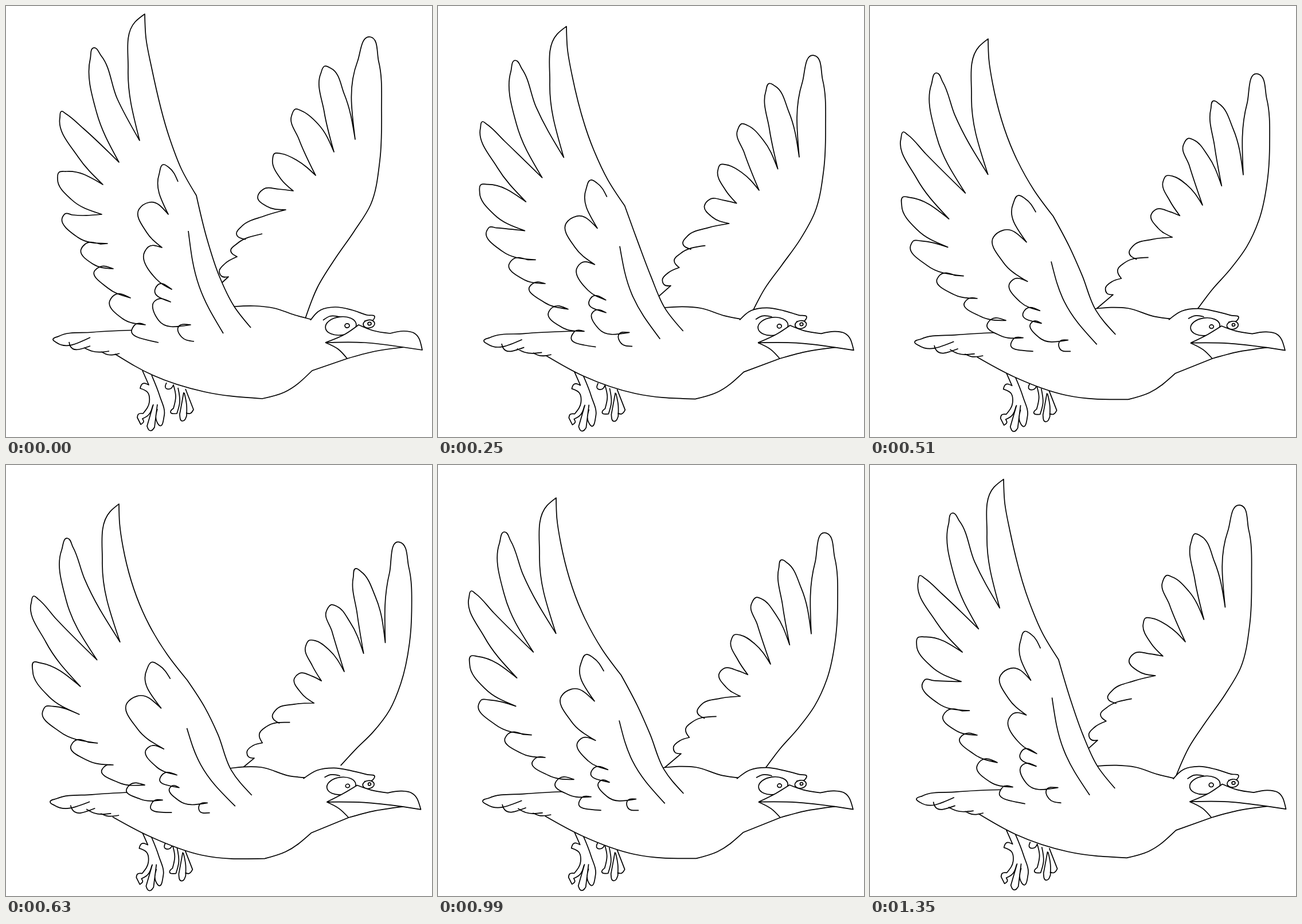
Write an HTML page that moves like this. It is 743 px wide and 753 px high and loops after 1.48 s.

```html
<!DOCTYPE html>
<html>
<head>
<meta charset="utf-8">
<style>
html, body { margin: 0; width: 100%; height: 100%; overflow: hidden; background: #fff; }
svg { display: block; width: 100%; height: 100%; fill: none; stroke: #000; stroke-width: 1.7; stroke-linejoin: round; }
.solid { fill: #fff; }
</style>
</head>
<body>
<svg id="stage" viewBox="0 0 743 753"></svg>
<script>
// Each part is [wings raised, wings lowered]: points of a smooth line, "/" is a corner, "|" lifts the pen.
const farEdge = [
  "522 546 543 492 573 443 607 394 636 347 652 270 655 185 650 97 635 54 613 97 609 233",
  "596 521 624 497 653 472 682 434 699 389 714 320 718 268 713 195 697 151 680 207 672 326"];
const farTips = [
  "590 154 567 109 556 105 549 118 555 185 572 255 / 545 207 515 183 505 180 498 192 511 233 540 296 / 508 270 480 258 468 258 465 268 480 303 501 323",
  "655 245 630 202 621 196 617 212 624 275 634 344 / 611 288 590 260 580 257 571 268 580 302 600 374 / 575 334 552 317 541 316 534 327 545 360 560 388"];
const farLow = [
  "476 320 449 320 439 334 455 350 488 356 / 450 367 411 385 402 398 418 408",
  "546 379 524 373 516 380 526 407 547 428 / 514 428 484 435 477 447 489 460"];
const farCoverts = [
  "447 398 402 416 392 427 403 438 / 382 450 372 464 376 472 388 473 / 350 508",
  "505 460 465 465 452 478 456 495 / 441 498 430 508 432 517 442 520 / 405 550"];

const nearEdge = [
  "427 562 398 525 372 472 350 405 332 331 / 306 285 285 230 254 108 244 55 242 14",
  "429 580 392 535 369 470 346 427 313 385 / 276 340 243 290 194 150 189 112 188 79"];
const nearTips = [
  "225 28 213 110 233 235 / 194 162 166 87 153 73 147 92 158 186 197 273 / 135 214 104 188 97 184 94 195 126 264 169 312",
  "173 92 159 180 192 324 / 125 205 107 155 98 139 87 160 94 245 151 354 / 78 280 46 243 39 238 34 250 58 318 122 402"];
const nearMid = [
  "105 289 92 291 90 303 114 338 167 364 / 116 365 103 363 99 368 125 404 177 415",
  "50 357 40 355 38 372 66 417 120 450 / 75 433 62 434 57 443 87 478 156 500"];
const nearLow = [
  "165 416 / 138 416 131 425 152 451 187 459 / 163 456 155 462 178 493 217 510 / 189 505 181 515 203 546 243 557 / 226 556 221 562 266 588",
  "140 498 / 115 496 110 503 140 529 187 537 / 176 539 170 546 200 567 247 569 / 222 569 216 577 240 591 279 591 / 264 593 259 601 294 611"];
const covertTips = [
  "300 307 284 282 275 277 267 294 283 364 / 250 343 232 355 245 395 272 422 / 248 421 242 429 262 477 289 495",
  "284 387 264 364 250 358 241 371 268 437 / 224 416 207 428 226 474 276 511 / 251 506 245 511 262 537 300 551"];
const covertLow = [
  "265 487 260 495 287 517 / 263 513 259 516 266 549 322 557 / 300 562 306 578 328 586 | 318 393 337 490 379 572",
  "276 550 271 556 305 573 / 295 570 291 574 309 594 357 597 / 345 600 343 608 361 612 | 315 473 340 530 404 601"];

const belly = [
  "190 608 256 645 346 674 447 686 / 485 675 534 637 / 595 616",
  "185 616 246 648 340 683 452 688 / 488 676 532 644 / 598 616"];
const back = [
  "534 548 504 540 468 528 433 524 398 525 / 235 566 / 150 570 92 577 82 583 88 588 147 579",
  "522 546 493 544 440 528 414 528 388 531 / 240 572 / 150 577 88 584 76 590 84 596 146 590"];
const tail = [
  "110 587 112 594 147 594 | 136 597 150 603 180 603 | 166 604 177 609 198 607",
  "113 596 116 603 157 601 | 141 602 154 609 184 610 | 165 610 176 614 197 613"];
const crown = [
  "531 549 549 531 574 526 603 531 630 540 643 543 640 549 625 550",
  "516 548 541 534 572 530 603 535 630 541 643 545 640 550 625 553"];
const brow = ["553 549 565 542 582 543", "556 545 566 541 583 543"];
const beak = [
  "557 588 592 573 615 557 / 640 567 670 572 / 694 568 711 571 726 601 / 692 596 / 625 588 557 588",
  "560 589 588 574 612 560 / 636 568 665 573 / 689 570 706 573 723 602 / 692 597 / 625 590 560 589"];
const jaw = ["557 588 580 600 595 616 / 640 604 695 596", "560 589 582 601 598 616 / 640 605 692 597"];

// Ovals: centre and radii
const eye = ["584 559 27 16", "585 561 25 15"];
const pupil = ["595 558.5 4 3.7", "596 561 3.5 3"];
const farEye = ["633 555.5 10 7", "632 559 10 7"];
const farPupil = ["634 555 3 2.7", "634 558 2.3 2.3"];

const leftFoot = "238 637 249 662 / 238 660 234 668 / 247 675 250 692 239 712 / 231 713 229 719 / 235 731 / 240 726 238 721 / 248 715 256 698"
  + "| 257 696 246 734 / 252 742 259 736 / 264 696 | 264 704 263 726 268 733 276 715 268 681 254 645";
const rightFoot = "280 658 279 668 288 668 292 662 / 296 682 292 703 / 287 709 298 712 / 303 692 300 667"
  + "| 310 675 303 713 / 308 725 315 716 / 315 697 311 676 | 313 669 327 705 / 321 712 314 711";

const number = /\d+(\.\d+)?/g;
const numbers = text => text.match(number).map(Number);
const join = (...parts) => [0, 1].map(i => parts.map(p => p[i]).join(" / "));
const lerp = (p, q, t) => [p[0] + (q[0] - p[0]) * t, p[1] + (q[1] - p[1]) * t];
const gap = (p, q) => Math.hypot(q[0] - p[0], q[1] - p[1]);

function mix([a, b], t) {
  const ends = numbers(b);
  let i = 0;
  return a.replace(number, n => (+n + (ends[i++] - n) * t).toFixed(2));
}

// Unit direction at b, leaning towards the nearer neighbour
function heading(a, b, c) {
  const l = gap(a, b), m = gap(b, c);
  const v = [0, 1].map(k => (b[k] - a[k]) / l * m + (c[k] - b[k]) / m * l);
  const size = Math.hypot(...v) || 1;
  return v.map(n => n / size);
}

function curve(points) {
  const last = points.length - 1;
  const dirs = points.map((p, i) => i > 0 && i < last && heading(points[i - 1], p, points[i + 1]));
  let d = "";
  for (let i = 0; i < last; i++) {
    const a = points[i], b = points[i + 1], reach = gap(a, b) / 3;
    const out = dirs[i] && a.map((n, k) => n + dirs[i][k] * reach);
    const into = dirs[i + 1] && b.map((n, k) => n - dirs[i + 1][k] * reach);
    d += out || into ? `C${out || lerp(a, into, 0.6)} ${into || lerp(b, out, 0.6)} ${b}` : `L${b}`;
  }
  return d;
}

function trace(text) {
  return text.split("|").map(line => {
    let d = "", end;
    for (const run of line.split("/")) {
      const n = numbers(run), points = end ? [end] : [];
      for (let i = 0; i < n.length; i += 2) points.push([n[i], n[i + 1]]);
      d += (end ? "" : `M${points[0]}`) + curve(points);
      end = points.at(-1);
    }
    return d;
  }).join("");
}

const farWing = join(farEdge, farTips, farLow);
const nearWing = join(nearEdge, nearTips, nearMid, nearLow);
const coverts = join(covertTips, covertLow);

function draw(t) {
  const open = part => `<path d="${trace(mix(part, t))}"/>`;
  const solid = part => `<path class="solid" d="${trace(mix(part, t))}"/>`;
  const oval = part => {
    const [x, y, rx, ry] = numbers(mix(part, t));
    return `<ellipse class="solid" cx="${x}" cy="${y}" rx="${rx}" ry="${ry}" transform="rotate(-7 ${x} ${y})"/>`;
  };
  const foot = text => `<path d="${trace(text)}" transform="translate(${-2 * t} ${2 * t})"/>`;
  stage.innerHTML = [
    open(farWing), open(farCoverts),
    foot(leftFoot), foot(rightFoot), solid(belly), solid(back), open(tail),
    solid(crown), open(brow), oval(eye), oval(pupil), oval(farEye), oval(farPupil), open(jaw), solid(beak),
    solid(nearWing), open(coverts)
  ].join("");
}

const stage = document.getElementById("stage");
const loop = 1480;
const starts = [0, 130, 250, 380, 510, 630, 760, 860, 990, 1120, 1250, 1350];
const begin = performance.now();
let shown = -1;
function tick() {
  const time = (performance.now() - begin) % loop;
  const step = starts.filter(s => s <= time).length - 1;
  if (step !== shown) draw(Math.min(step, 12 - step) / 6);
  shown = step;
  requestAnimationFrame(tick);
}
tick();
</script>
</body>
</html>
```
